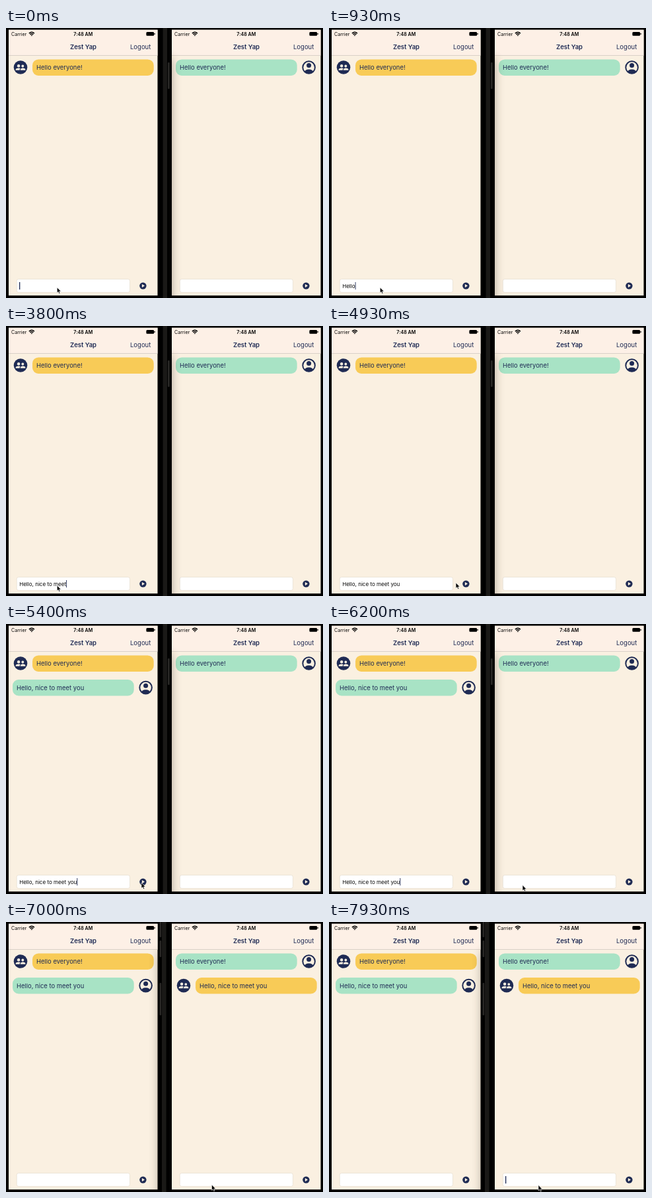
An HTML page for the animation above (8 s loop, 480 px wide and 408 px high).

```html
<!DOCTYPE html>
<html lang="en">
<head>
<meta charset="utf-8">
<title>Two phones chatting</title>
<style>
  html, body { margin: 0; width: 100%; height: 100%; overflow: hidden; background: #000; }
  svg { display: block; font-family: Inter, Roboto, sans-serif; }
  text { white-space: pre; }
  .navy { fill: #1f2b54; }
  .cream { fill: #faf0e1; }
  .status { font-size: 7.1px; }
  .bar { font-size: 9.5px; }
  .bold { font-weight: 600; text-anchor: middle; }
  .bubble { font-size: 9.45px; }
  .input { font-size: 8.05px; fill: #0a0a0a; }
</style>
</head>
<body>
<svg width="480" height="408" viewBox="0 0 480 408">
  <defs>
    <filter id="soft" x="-150%" y="-20%" width="400%" height="140%"><feGaussianBlur stdDeviation="7.5"/></filter>
    <clipPath id="screen"><rect x="4" y="2.5" width="225.7" height="402"/></clipPath>
    <clipPath id="disc"><circle r="9.3"/></clipPath>

    <g id="other">
      <circle class="navy" r="10.3"/>
      <g class="cream">
        <circle cx="-2.9" cy="-2.3" r="2.2"/>
        <circle cx="3.3" cy="-2" r="1.9"/>
        <path d="M-7.4 4.2 V3.2 C-7.4 1.6 -4.6 .9 -2.9 .9 C-1.9 .9 -.9 1.1 -.1 1.5 C-1 2.2 -1.3 3 -1.3 4.2 Z"/>
        <path d="M-.3 4.2 C-.3 1.9 1.6 1 3.3 1 C5 1 7.4 1.7 7.4 3.3 V4.2 Z"/>
      </g>
    </g>
    <g id="me">
      <circle r="9.3" fill="#faf0e1" stroke="#1f2b54" stroke-width="2"/>
      <circle class="navy" cy="-2.9" r="3.5"/>
      <ellipse class="navy" cy="8.2" rx="7.2" ry="5.1" clip-path="url(#disc)"/>
    </g>

    <g id="chrome">
      <rect class="cream" x="4" y="2.5" width="225.7" height="402"/>
      <rect x="4" y="2.5" width="225.7" height="39" fill="#fdf0e6"/>
      <rect x="4" y="41" width="225.7" height=".8" fill="#d3cac2"/>
      <text class="status" x="8" y="11.6">Carrier</text>
      <g fill="none" stroke="#000" stroke-width="1.5">
        <path d="M34.9 8.1 Q38.9 4.4 42.9 8.1"/>
        <path d="M36.5 9.9 Q38.9 7.7 41.3 9.9"/>
      </g>
      <path d="M37.5 10.9 Q38.9 9.9 40.3 10.9 L38.9 12.3 Z"/>
      <text class="status bold" x="116.8" y="11.6">7:48 AM</text>
      <rect x="212.4" y="5.9" width="11.8" height="5.8" rx="1.5"/>
      <rect x="224.6" y="7.7" width="1" height="2.2" rx=".5"/>
      <text class="bar bold navy" x="117" y="31.8">Zest Yap</text>
      <text class="bar navy" x="188" y="31.8">Logout</text>
      <rect x="16.2" y="379.4" width="171.3" height="20.2" rx="3" fill="#fff" stroke="#e6ddce" stroke-width=".7"/>
      <circle class="navy" cx="207.4" cy="389.6" r="5.2"/>
      <path class="cream" d="M205.9 387 L210 389.6 L205.9 392.2 Z"/>
    </g>
  </defs>

  <rect width="480" height="408"/>

  <g id="left" clip-path="url(#screen)">
    <use href="#chrome"/>
    <rect id="mark" y="384" height="11.4" fill="#cdd1d8"/>
    <text id="typed" class="input" x="20.2" y="392.5"></text>
    <rect id="caretL" y="384" height="11.2" class="navy"/>
    <rect id="shadeL" x="232" y="46" width="30" height="400" fill="#352a20" filter="url(#soft)"/>
  </g>

  <g transform="translate(247)">
    <g id="right" clip-path="url(#screen)">
      <use href="#chrome"/>
      <rect id="caretR" x="20" y="384" width="1.3" height="11.2" class="navy"/>
      <rect id="shadeR" x="-26" y="46" width="29" height="400" fill="#352a20" filter="url(#soft)"/>
    </g>
  </g>

  <g id="frameL">
    <rect x="237.6" width="6.4" height="408" fill="#1a1917"/>
    <rect x="245" y="52" width="2.6" height="40" rx="1" fill="#292826"/>
  </g>
  <g id="frameR">
    <rect x="236" width="6.6" height="408" fill="#1a1917"/>
    <g fill="#292826">
      <rect x="232.6" y="0" width="2.6" height="23" rx="1"/>
      <rect x="232.6" y="28" width="2.6" height="25" rx="1"/>
      <rect x="232.6" y="92" width="2.6" height="49" rx="1"/>
    </g>
  </g>

  <path id="pointer" d="M0 0 V8.3 L1.9 6.6 L3.2 9.6 L4.6 9 L3.4 6.1 H6 Z" stroke="#fff" stroke-width=".6"/>
</svg>

<script>
const LOOP = 8000;
const SEND = 5330, RECEIVE = 6470;
const MESSAGE = "Hello, nice to meet you";

// moment each character of the message is typed
const keys = [530, 670, 730, 800, 930, 1730, 1800, 2070, 2200, 2530, 2730, 2800,
  2870, 3000, 3070, 3270, 3400, 3530, 3800, 3870, 4130, 4200, 4270];
const blinks = [70, 1470, 4730, 5730, 6730, 7730];
// time, x, y
const path = [[0, 77.3, 392], [4690, 77.3, 392], [4930, 192, 388], [5080, 205, 391],
  [5790, 205, 391], [6200, 293, 394.6], [6530, 306.5, 396.6], [6700, 306.5, 396.6],
  [7330, 317, 397.6], [LOOP, 317, 397.6]];

const $ = id => document.getElementById(id);
const clamp = v => Math.max(0, Math.min(1, v));
const show = (el, on) => el.setAttribute("opacity", +on);

function addMessage(side, who, row, text) {
  const mine = who === "me", x = mine ? 10 : 40, y = 47.4 + row * 36.6;
  const g = document.createElementNS("http://www.w3.org/2000/svg", "g");
  g.innerHTML = `<rect x="${x}" y="${y}" width="183.7" height="24.5" rx="9" fill="${mine ? "#a8e3c5" : "#f8cb57"}"/>
    <text class="bubble navy" x="${x + 6}" y="${y + 15.7}">${text}</text>
    <use href="#${who}" x="${mine ? 211.6 : 22}" y="${y + 12.1}"/>`;
  const screen = $(side);
  screen.insertBefore(g, screen.lastElementChild);
  return g;
}

addMessage("left", "other", 0, "Hello everyone!");
addMessage("right", "me", 0, "Hello everyone!");
const sent = addMessage("left", "me", 1, MESSAGE);
const received = addMessage("right", "other", 1, MESSAGE);

function caretAlpha(t, lastKey) {
  const start = blinks.filter(b => b <= t).pop();
  if (start === undefined || lastKey > start) return 1;
  const d = t - start;
  return clamp(Math.max(1 - d / 170, (d - 330) / 120));
}

function pointerAt(t) {
  const i = path.findIndex(p => p[0] > t);
  const [t0, x0, y0] = path[i - 1], [t1, x1, y1] = path[i];
  const k = (t - t0) / (t1 - t0);
  return [x0 + (x1 - x0) * k, y0 + (y1 - y0) * k];
}

function render(t) {
  const count = keys.filter(k => k <= t).length;
  const text = t < RECEIVE ? MESSAGE.slice(0, count) : "";
  const typed = $("typed");
  typed.textContent = text;
  const end = 20.2 + (text ? typed.getComputedTextLength() : 0);

  const caret = $("caretL");
  caret.setAttribute("x", text ? end : 20);
  caret.setAttribute("width", text ? 0.9 : 1.3);
  show(caret, caretAlpha(t, count ? keys[count - 1] : -1));
  show($("caretR"), t >= 7600);

  const marked = t >= 2400 && t < 2530;
  const mark = $("mark");
  mark.setAttribute("x", 43.2);
  mark.setAttribute("width", marked ? Math.max(0, end - 43.2) : 0);

  show(sent, t >= SEND);
  show(received, t >= RECEIVE);

  // the window in front casts its shadow on the other one
  const swapped = t >= RECEIVE;
  show($("frameL"), !swapped);
  show($("frameR"), swapped);
  $("shadeR").setAttribute("opacity", swapped ? 0 : 0.42);
  $("shadeL").setAttribute("opacity", 0.42 * clamp((t - RECEIVE + 30) / 160));

  $("pointer").setAttribute("transform", `translate(${pointerAt(t)})`);
}

const begin = performance.now();
function tick() {
  render((performance.now() - begin) % LOOP);
  requestAnimationFrame(tick);
}
tick();
</script>
</body>
</html>
```
